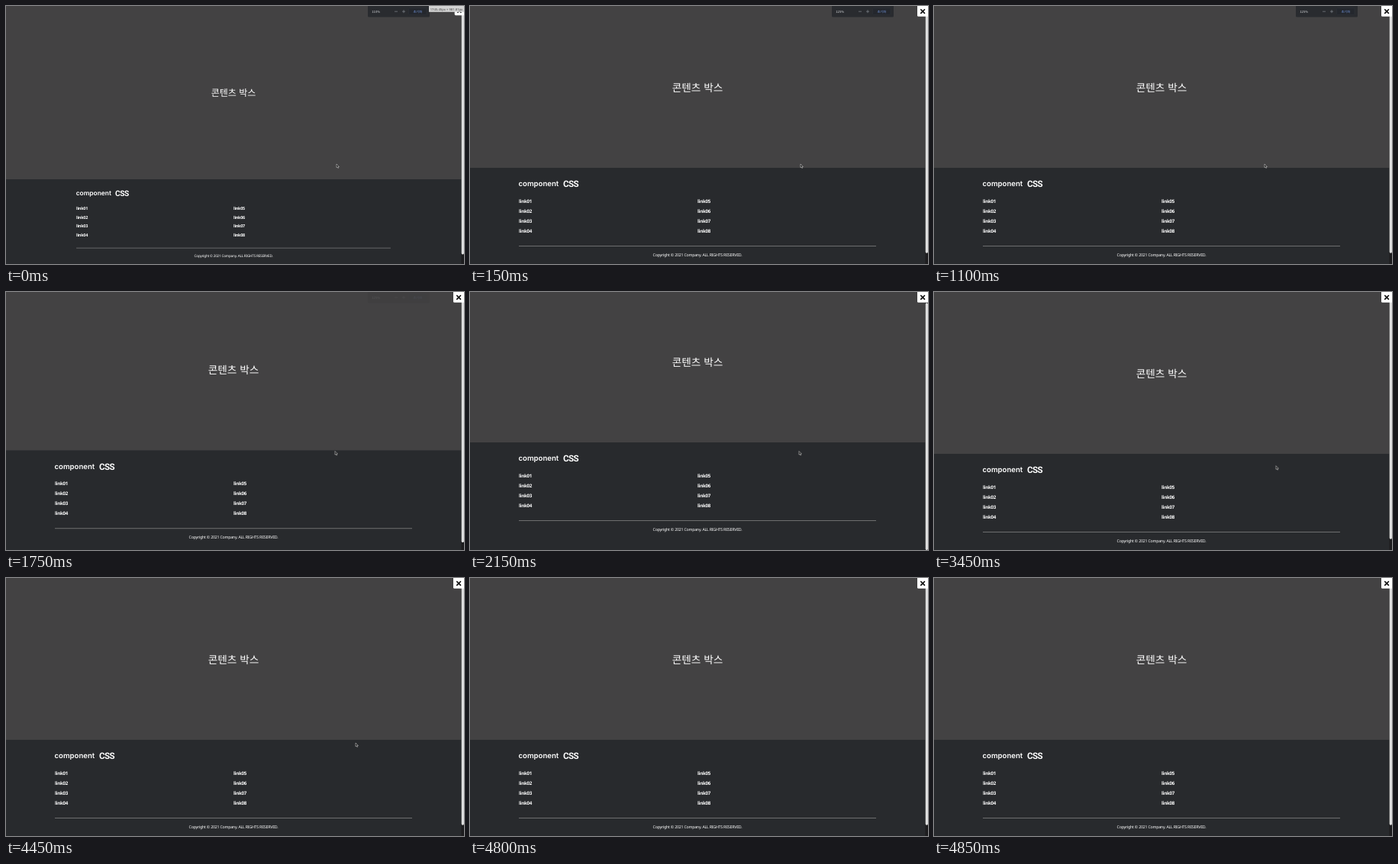
Write an HTML page that moves like this. It is 600 px wide and 338 px high and loops after 5 s.

```html
<!DOCTYPE html>
<html lang="ko">
<head>
<meta charset="utf-8">
<title>component CSS</title>
<style>
html, body { margin: 0; width: 100%; height: 100%; overflow: hidden; background: #434243; }
svg { display: block; width: 100%; height: 100%; }
text { fill: #fff; text-rendering: geometricPrecision; font-family: "Noto Sans", "Open Sans", sans-serif; }
.title { font: 500 13.67px "Noto Sans CJK KR", "Noto Sans CJK", sans-serif; text-anchor: middle; }
.brand { font: 600 9.6px Inter, sans-serif; }
.brand-bold { font: 700 11.6px Roboto, sans-serif; letter-spacing: -.6px; }
.link { font-size: 6.2px; font-weight: 600; letter-spacing: -.3px; }
.copy { font-size: 5.3px; font-weight: 500; letter-spacing: -.25px; text-anchor: middle; }
.zoom text { font: 400 4.2px "Noto Sans CJK KR", "Noto Sans CJK", sans-serif; fill: #d8dade; }
.zoom .reset { fill: #7398e0; text-anchor: middle; }
.size text { font-size: 4.2px; fill: #444; text-anchor: middle; }
</style>
</head>
<body>
<svg viewBox="0 0 600 338" preserveAspectRatio="none">
  <rect width="600" height="338" fill="#434243"/>
  <g id="content"><text class="title" y="5.5">콘텐츠 박스</text></g>
  <rect id="footerBg" width="600" height="160" fill="#282a2d"/>
  <g id="footer">
    <text class="brand" x="-234.5" y="24.2">component</text>
    <text class="brand-bold" x="-176" y="25.2">CSS</text>
    <g id="links"></g>
    <rect x="-234" y="102" width="468" height=".7" fill="#8c8c8c"/>
    <text class="copy" y="115.9">Copyright © 2021 Company. ALL RIGHTS RESERVED.</text>
  </g>
  <rect x="596.5" width="3.5" height="338" fill="#1d1d1f"/>
  <rect id="thumb" x="596.7" width="3.3" rx="1.6" fill="#dedede"/>
  <g id="close">
    <path d="M0 0H-14V12.3Q-14 13.8-12.5 13.8H0Z" fill="#fff"/>
    <path d="M-9.7 4.3L-4.1 9.9M-4.1 4.3L-9.7 9.9" stroke="#000" stroke-width="1.5"/>
  </g>
  <g id="zoom" class="zoom">
    <path d="M474 0H555V13Q555 14.5 553.5 14.5H475.5Q474 14.5 474 13Z" fill="#292b2f"/>
    <text id="percent" x="479.3" y="8.7"></text>
    <path d="M509 7.2H513M519 7.2H523M521 5.2V9.2" stroke="#8f949a" stroke-width=".6"/>
    <rect x="527.5" y="2.8" width="23.5" height="8.6" rx="1.3" fill="#24272d" stroke="#34383f" stroke-width=".4"/>
    <text class="reset" x="539.3" y="8.7">초기화</text>
  </g>
  <g id="size" class="size">
    <rect x="554" width="46" height="7.8" fill="#d3d3d3"/>
    <text x="577" y="5.5">1745.45px × 981.81px</text>
  </g>
  <path id="cursor" d="M0 0V4.7L1.1 3.8L1.9 5.5L2.7 5.1L2 3.5H3.4Z" fill="#1b1b1b" stroke="#ddd" stroke-width=".5"/>
</svg>
<script>
const LOOP = 5000, STEP = 50, VIEW = 338, MIDDLE = 298, FOOTER_HEIGHT = 141, SCROLL = 15;
const $ = id => document.getElementById(id);
const move = (id, x, y, scale = 1) =>
  $(id).setAttribute('transform', `translate(${x} ${y}) scale(${scale})`);

const progress = (t, from, to) => Math.min(1, Math.max(0, (t - from) / (to - from)));
const ease = (t, from, to) => {
  const p = progress(t, from, to);
  return p < .5 ? 4 * p ** 3 : 1 - 4 * (1 - p) ** 3;
};

// Cursor movements, each added to the ones before.
const glides = [
  { from: 1100, to: 1200, dx: -2, dy: 1.5 },
  { from: 2150, to: 2800, dx: 15, dy: 25.5 },
  { from: 3350, to: 3650, dx: 6, dy: -19 },
  { from: 4400, to: 4450, dx: 6, dy: 1 },
  { from: 4450, to: 4600, dx: 143, dy: 6 }
];

for (let i = 0; i < 8; i++) {
  const link = document.createElementNS('http://www.w3.org/2000/svg', 'text');
  link.setAttribute('class', 'link');
  link.setAttribute('x', i < 4 ? -234 : 0);
  link.setAttribute('y', 45.7 + i % 4 * 13);
  link.textContent = `link0${i + 1}`;
  $('links').append(link);
}

function drawPage(t, zoomed) {
  const scale = zoomed ? 1 : .88;
  const top = zoomed ? 212 : 227;
  const scroll = SCROLL * (ease(t, 1640, 1900) - ease(t, 2740, 3040));
  const pageHeight = top + FOOTER_HEIGHT * scale;
  move('content', MIDDLE, top / 2 - scroll, scale);
  move('footer', MIDDLE, top - scroll, scale);
  move('footerBg', 0, top - scroll);
  move('close', 600, 0, scale);
  $('thumb').setAttribute('y', scroll * VIEW / pageHeight);
  $('thumb').setAttribute('height', VIEW * VIEW / pageHeight);
}

function drawOverlays(t, zoomed) {
  const fade = .9 * progress(t, 1100, 1200) + .1 * progress(t, 1750, 1900);
  $('zoom').setAttribute('opacity', 1 - fade);
  $('percent').textContent = zoomed ? '125%' : '110%';
  $('size').setAttribute('visibility', zoomed ? 'hidden' : 'visible');

  let x = 433, y = 207;
  for (const { from, to, dx, dy } of glides) {
    const p = progress(t, from, to);
    x += dx * p;
    y += dy * p;
  }
  move('cursor', x, y);
}

const start = performance.now();
function tick() {
  const elapsed = (performance.now() - start) % LOOP;
  const t = Math.floor(elapsed / STEP) * STEP;
  const zoomed = t >= STEP;
  drawPage(t, zoomed);
  drawOverlays(t, zoomed);
  requestAnimationFrame(tick);
}
tick();
</script>
</body>
</html>
```
